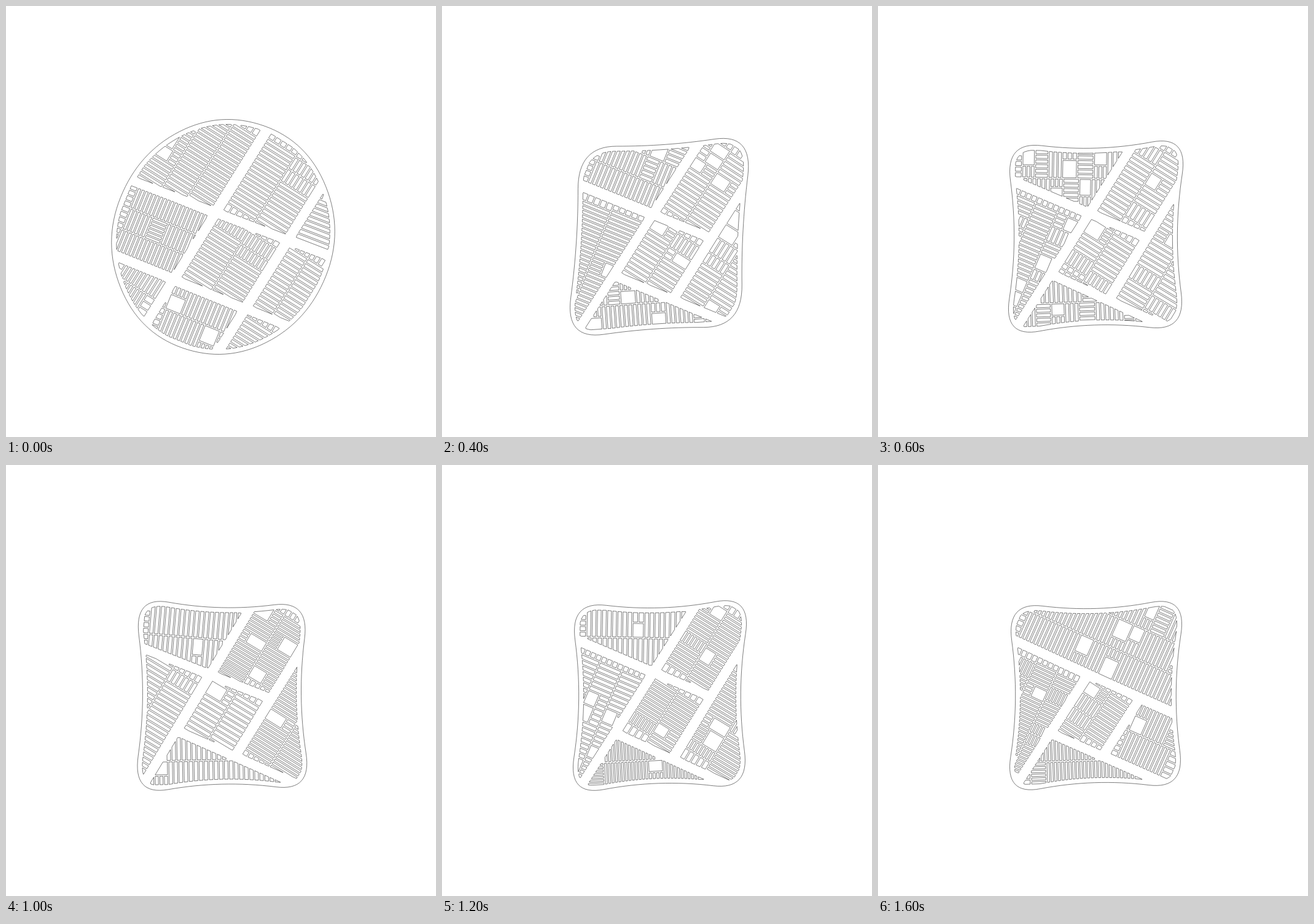
These frames come from a looping animation (700 by 701 pixels, 1800 ms). An HTML page with a canvas:

```html
<!DOCTYPE html>
<html lang="en">
<head>
<meta charset="utf-8">
<title>City blocks</title>
<style>
  html, body { margin: 0; height: 100%; overflow: hidden; background: #fff; }
  canvas { display: block; width: 700px; height: 701px; }
</style>
</head>
<body>
<canvas id="stage" width="700" height="701"></canvas>
<script>
const ctx = document.getElementById('stage').getContext('2d');
const STEP = 200, MARGIN = 8, ROAD = 8, GAP = 1.2, DEPTH = 44;

const mix = (a, b, t) => a.map((v, i) => v + (b[i] - v) * t);
const shrink = (a, k) => a.map((v, i) => {
  const c = i % 2 ? 375.5 : 354;
  return i < 8 ? c + (v - c) * k : v;
});

// City limits: four corners clockwise from top left, pinch of the sides, corner cut
const round = [216,238, 491,220, 491,513, 216,531, -59, .5];
const tilted = [243,240, 508,203, 470,512, 195,548, -8, .5];
const square = [207,220, 505,210, 502,530, 204,540, 23, .4];
const leaning = [208,213, 494,220, 498,531, 206,538, 22, .4];

// Crossings of the roads A and B (running down) with C and D (running across): AC, BC, AD, BD
const wide = [341,336, 459,381, 273,445, 389,492];
const narrow = [341,342, 440,379, 276,441, 375,476];
const steep = [344,337, 438,377, 281,436, 375,479];
const flat = [332,341, 431,380, 277,432, 372,474];
const merged = [342,340, 427,379, 280,436, 366,474];

// Roads in cutting order: ">" starts at its first crossing, "<" ends at its second, "=" does both
const through = 'A B C D', bent = 'A D> B< C<', capped = 'C A> D> B=';

const poses = [
  [round, wide, through],
  [tilted, narrow, through],
  [mix(tilted, square, .6), mix(narrow, steep, .6), bent],
  [square, steep, bent],
  [shrink(square, .996), steep, bent],
  [leaning, flat, bent],
  [shrink(square, .993), steep, bent],
  [shrink(square, .99), steep, bent],
  [shrink(square, .986), merged, capped]
];

function random(seed) {
  let s = seed * 7919 + 17;
  return () => {
    s = (s * 1664525 + 1013904223) % 4294967296;
    return s / 4294967296;
  };
}

function outline(shape) {
  const [pinch, cut] = shape.slice(8), pts = [];
  const corner = i => shape.slice(i % 4 * 2, i % 4 * 2 + 2);
  const side = i => {
    const a = corner(i), b = corner(i + 1);
    const dx = b[0] - a[0], dy = b[1] - a[1], k = pinch / Math.hypot(dx, dy);
    return [(a[0] + b[0]) / 2 - dy * k, (a[1] + b[1]) / 2 + dx * k];
  };
  const bend = (a, b, c) => {
    for (let t = 0; t < .99; t += 1 / 16) pts.push(mix(mix(a, b, t), mix(b, c, t), t));
  };
  for (let i = 0; i < 4; i++) {
    const c = corner(i), before = side(i + 3), after = side(i);
    const start = mix(c, after, cut);
    bend(mix(c, before, cut), c, start);
    bend(start, after, mix(corner(i + 1), after, cut));
  }
  return pts;
}

const inset = (poly, d) => poly.map(([x, y], i) => {
  const p = poly.at(i - 1), q = poly[(i + 1) % poly.length];
  const dx = q[0] - p[0], dy = q[1] - p[1], k = d / Math.hypot(dx, dy);
  return [x - dy * k, y + dx * k];
});

// Distance of p from the line a-b, positive on its right
const dist = (p, a, b) =>
  ((b[0] - a[0]) * (p[1] - a[1]) - (b[1] - a[1]) * (p[0] - a[0])) / Math.hypot(b[0] - a[0], b[1] - a[1]);

// Part of the polygon that lies at least `off` from the line on the given side
function clip(poly, a, b, side = 1, off = 0) {
  const out = [];
  poly.forEach((p, i) => {
    const q = poly[(i + 1) % poly.length];
    const d = side * dist(p, a, b) - off, e = side * dist(q, a, b) - off;
    if (d >= 0) out.push(p);
    if ((d >= 0) !== (e >= 0)) out.push(mix(p, q, d / (d - e)));
  });
  return out;
}

function measure(poly) {
  let area = 0, x = 0, y = 0;
  poly.forEach((p, i) => {
    const q = poly[(i + 1) % poly.length], k = p[0] * q[1] - q[0] * p[1];
    area += k / 2;
    x += (p[0] + q[0]) * k / 6;
    y += (p[1] + q[1]) * k / 6;
  });
  return { area: Math.abs(area), center: [x / area, y / area] };
}

function divide(land, crossings, plan) {
  const [ac, bc, ad, bd] = [0, 2, 4, 6].map(i => crossings.slice(i, i + 2));
  const roads = { A: [ac, ad], B: [bc, bd], C: [ac, bc], D: [ad, bd] };
  let blocks = [land];
  for (const [name, mark = ''] of plan.split(' ')) {
    const [a, b] = roads[name];
    const dx = b[0] - a[0], dy = b[1] - a[1];
    blocks = blocks.flatMap(block => {
      const [x, y] = measure(block).center;
      const along = ((x - a[0]) * dx + (y - a[1]) * dy) / (dx * dx + dy * dy);
      if ('>='.includes(mark || ' ') && along < 0) return [block];
      if ('<='.includes(mark || ' ') && along > 1) return [block];
      return [1, -1].map(side => clip(block, a, b, side, ROAD)).filter(part => part.length > 2);
    });
  }
  return blocks;
}

// Smallest rectangle around the polygon, with its long side along the angle
function frame(poly) {
  let best = { size: Infinity };
  for (let deg = 0; deg < 180; deg++) {
    const c = Math.cos(deg * Math.PI / 180), s = Math.sin(deg * Math.PI / 180);
    const us = poly.map(([x, y]) => x * c + y * s), vs = poly.map(([x, y]) => y * c - x * s);
    const u = Math.min(...us), v = Math.min(...vs);
    const w = Math.max(...us) - u, h = Math.max(...vs) - v;
    if (w >= h && w * h < best.size) best = { size: w * h, c, s, u, v, w, h };
  }
  return best;
}

function trace(path, poly) {
  poly.forEach(([x, y], i) => i ? path.lineTo(x, y) : path.moveTo(x, y));
  path.closePath();
}

// Rows of narrow lots across the block, broken by turned groups, large lots and small end lots
function parcel(path, block, rnd) {
  const f = frame(block), pitch = 5.5 + rnd() * 3;
  const at = (u, v) => [(f.u + u) * f.c - (f.v + v) * f.s, (f.u + u) * f.s + (f.v + v) * f.c];

  const lot = (u, v, w, h) => {
    const [l, t, r, b] = [u + GAP, v + GAP, u + w - GAP, v + h - GAP];
    if (r <= l || b <= t) return;
    const box = [at(l, t), at(r, t), at(r, b), at(l, b)];
    const shape = box.reduce((poly, p, i) => clip(poly, p, box[(i + 1) % 4]), block);
    if (measure(shape).area > 9) trace(path, shape);
  };
  const grid = (u, v, w, h, cols, rows) => {
    for (let i = 0; i < cols; i++)
      for (let j = 0; j < rows; j++) lot(u + w * i / cols, v + h * j / rows, w / cols, h / rows);
  };
  const fit = length => Math.max(1, Math.round(length / pitch));

  const rows = Math.max(1, Math.round(f.h / DEPTH)), d = f.h / rows;
  for (let row = 0; row < rows; row++) {
    const v = row * d;
    let u = 0;
    while (u < f.w - .01) {
      const left = f.w - u, kind = rnd();
      const end = u === 0 || left < 20;
      let w = end ? 10 + rnd() * 4 : kind < .6 ? pitch * (3 + Math.floor(rnd() * 5)) : 18 + rnd() * 10;
      if (left - w < 8) w = left;
      if (end) grid(u, v, w, d, 1, Math.max(1, Math.round(d / 10)));
      else if (kind < .6) grid(u, v, w, d, fit(w), 1);
      else if (kind < .8) {
        const part = d * (.5 + rnd() * .2), top = rnd() < .5;
        lot(u, top ? v : v + d - part, w, part);
        grid(u, top ? v + part : v, w, d - part, fit(w), 1);
      } else grid(u, v, w, d, 1, fit(d));
      u += w;
    }
  }
}

const paths = poses.map(([shape, crossings, plan], i) => {
  const path = new Path2D(), edge = outline(shape);
  trace(path, edge);
  divide(inset(edge, MARGIN), crossings, plan)
    .forEach((block, j) => parcel(path, block, random(i * 16 + j)));
  return path;
});

let shown = -1;
function draw(now) {
  const i = Math.floor(now / STEP) % paths.length;
  if (i !== shown) {
    shown = i;
    ctx.fillStyle = '#fff';
    ctx.fillRect(0, 0, 700, 701);
    ctx.strokeStyle = '#111';
    ctx.lineWidth = .55;
    ctx.stroke(paths[i]);
  }
  requestAnimationFrame(draw);
}
draw(performance.now());
</script>
</body>
</html>
```
